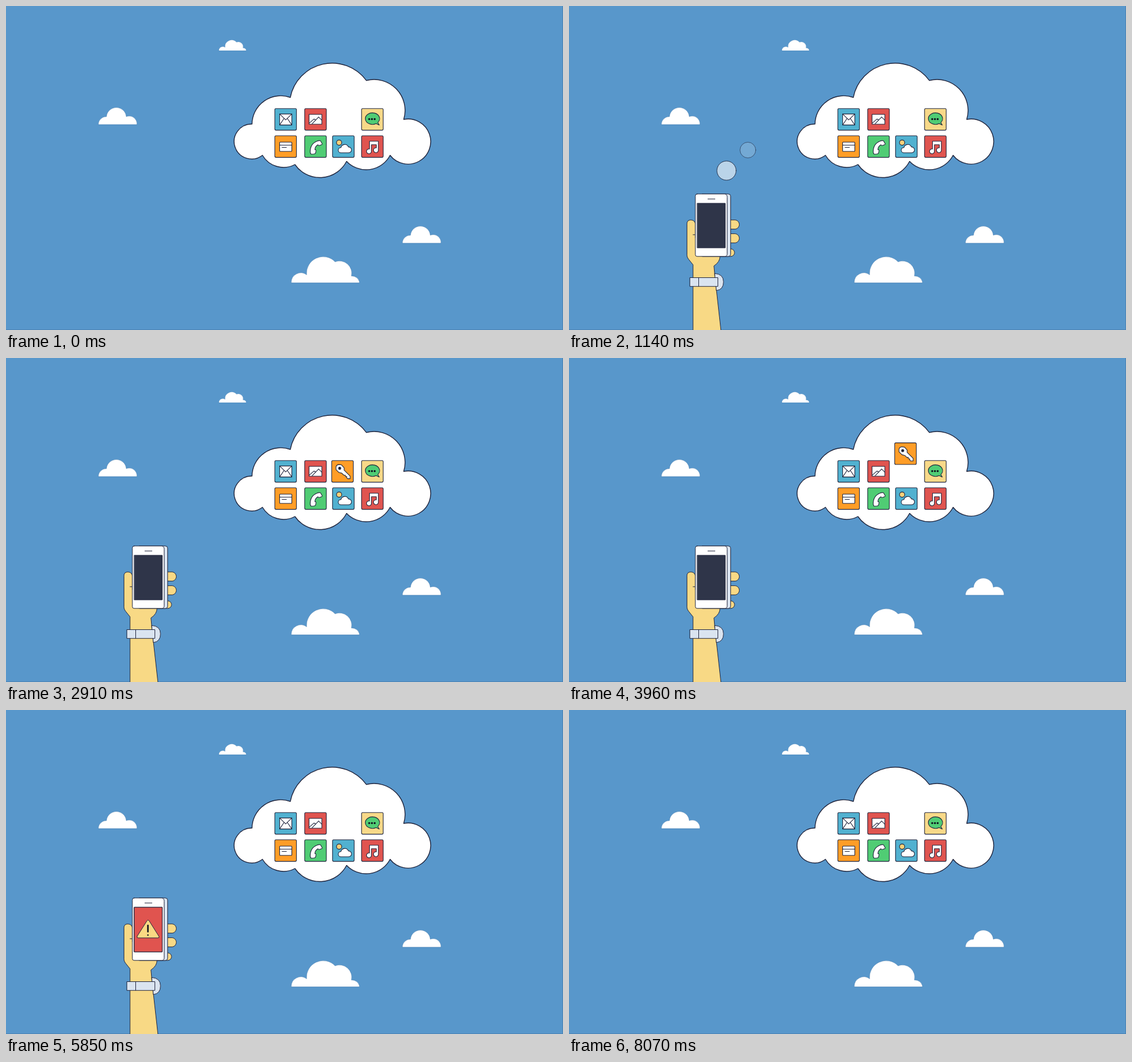
An HTML page for the animation above (8.1 s loop, 960 px wide and 560 px high).

```html
<!DOCTYPE html>
<html lang="en">
<head>
<meta charset="utf-8">
<title>Cloud key</title>
<style>
html, body { margin: 0; width: 100%; height: 100%; overflow: hidden; background: #5897cb; }
svg { display: block; width: 960px; height: 560px; }
</style>
</head>
<body>
<svg viewBox="0 0 960 560" fill="#fff" stroke="#20253d" stroke-width="1.1" stroke-linejoin="round" stroke-linecap="round">
  <defs>
    <filter id="blur" filterUnits="userSpaceOnUse" x="150" y="280" width="180" height="700">
      <feGaussianBlur id="smear" stdDeviation="0 0"/>
    </filter>
    <path id="puff" d="M159 204.5A13.5 13.5 0 0 1 173 191A17.05 17.05 0 0 1 207 191A13.5 13.5 0 0 1 225.5 204.5Z"/>
    <path id="drift" d="M0 45A16.5 16.5 0 0 1 26.5 31.5A28.5 28.5 0 0 1 75.5 9A21 21 0 0 1 103.5 33.5A13 13 0 0 1 117.5 45Z"/>
    <rect id="tile" width="37.3" height="37.3" rx="2"/>
  </defs>

  <rect width="960" height="560" fill="#5897cb" stroke="none"/>
  <path d="M959.5 0V559.5H0" fill="none" stroke="#4a82b4"/>

  <g stroke="#35699b" stroke-opacity=".5" stroke-width=".7">
    <use href="#puff" x=".2" y=".2"/>
    <use href="#puff" x="524.2" y="205.200"/>
    <use href="#drift" x="491.7" y="433.200"/>
    <use href="#drift" transform="translate(367 59) scale(.4)"/>
  </g>

  <path stroke-width="1.4" d="M424 204A30.2 30.2 0 1 0 442 258A42 42 0 0 0 498 274A52 52 0 0 0 587 268.500A46.500 46.500 0 0 0 662 258A39 39 0 1 0 685.500 196A53.500 53.500 0 0 0 621 128.700A73.300 73.300 0 0 0 490 158A49.500 49.500 0 0 0 424 204Z"/>

  <g transform="translate(463.3 177.3)">
    <use href="#tile" fill="#51b1d0"/>
    <rect x="8.300" y="9.300" width="21" height="19"/>
    <path fill="none" d="M8.300 9.300L18.800 19.500L29.300 9.300M8.300 28.300L16 17M29.300 28.300L21.500 17"/>
  </g>
  <g transform="translate(514.8 177.3)">
    <use href="#tile" fill="#e0544f"/>
    <rect x="7.500" y="10" width="22" height="17"/>
    <path fill="none" d="M8 25L16 18L19 20M13 26L24 14.500L29.500 20"/>
  </g>
  <g transform="translate(612.8 177.3)">
    <use href="#tile" fill="#f8d988"/>
    <path fill="#50cc74" d="M25 26L30.500 28.500L28 24A12.300 10 0 1 0 25 26Z"/>
    <path d="M13.200 18.200h.01M17.900 18.200h.01M22.600 18.200h.01" stroke-width="3.500" stroke="#101420"/>
  </g>
  <g transform="translate(463.3 224.3)">
    <use href="#tile" fill="#ff9d27"/>
    <rect x="8.300" y="11" width="21" height="16" rx="1"/>
    <path d="M8.300 16.200h21M12.500 20.200h7.500"/>
  </g>
  <g transform="translate(514.8 224.3)">
    <use href="#tile" fill="#50cc74"/>
    <path d="M21 9.500Q24 8 27 8.500L30 13.500Q30.500 15 29 15.500L25 17Q23.500 17 23 15.500Q18 18 17.500 24Q19 23.500 19.500 25L19 29Q18.500 31 16.500 31.500L11.500 32Q9.500 31 9.500 28Q9.500 14 21 9.500Z"/>
  </g>
  <g transform="translate(562.8 224.3)">
    <use href="#tile" fill="#51b1d0"/>
    <circle cx="11.300" cy="11.800" r="4.500" fill="#f8d27a"/>
    <path d="M14.500 29.500a4.600 4.600 0 0 1 0-9.200a6.700 6.700 0 0 1 12.800-1a5 5 0 0 1 .5 10.200z"/>
  </g>
  <g transform="translate(612.8 224.3)">
    <use href="#tile" fill="#e0544f"/>
    <path d="M13.700 9.500H29V25a4.200 4.200 0 1 1-3.500-4.200V15.500H17V27a4.200 4.200 0 1 1-3.300-4.200Z"/>
  </g>

  <g id="key">
    <use href="#tile" fill="#ff9d27"/>
    <path d="M7.500 10.500Q9 7 12.500 6.800L17 7.500L21.500 12.500V16.500L31.800 26.800V31.300H27.500L26 29.800V27.600H23.600V25.200H21L17.500 21.800L12.500 20.500L7.500 15.500Z"/>
    <circle cx="13.800" cy="13.300" r="2" fill="#101420"/>
  </g>

  <g id="dots" stroke="#26344f" stroke-width="1"></g>

  <g id="hand" stroke-width="1">
    <g fill="#f8d985">
      <path d="M270 369.500h16.500a8 8 0 0 1 0 15.800H270zM270 393.300h16.500a8 8 0 0 1 0 15.800H270zM260 419.500h18.500a6.500 6.500 0 0 1 0 13H260z"/>
      <path d="M213.500 600V447L205.500 437Q203 434 203 430V376Q203 369.500 210 369.500Q217 370 217.500 377V400H260V432Q260 442 249.500 449L251.500 470L266 600Z"/>
    </g>
    <path d="M213.500 395h4"/>
    <g fill="#dae4f0">
      <path d="M251 462Q266 463 266 476.500Q266 490 254 491.500Z"/>
      <path d="M208.300 469.200h48v15.200h-48zM223.200 469.200v15.200"/>
      <rect x="226" y="324.600" width="52.300" height="108" rx="4"/>
    </g>
    <path d="M220.500 324.600H268Q272.300 325 272.300 330V428Q272.300 432.500 268 432.500H220.500Q217.500 432.500 217.500 429.500V328Q217.500 324.600 220.500 324.600ZM239 333.300h12.300"/>
    <rect x="221" y="340.700" width="48" height="77" fill="#2f3549"/>
    <g id="alert">
      <rect x="221" y="340.700" width="48" height="77" fill="#e0544f"/>
      <path id="sign" d="M242.800 363.800Q244.500 361.300 246.200 363.800L263.300 391Q264.300 393.600 261.500 393.600H227.500Q224.700 393.600 225.700 391Z"/>
      <path d="M244.300 372v11M244.300 388.700v.01" stroke="#101420" stroke-width="2.600"/>
    </g>
  </g>
</svg>
<script>
const LOOP = 8100, DROP = 240;
const $ = id => document.getElementById(id);
const ramp = (t, a, b) => Math.min(1, Math.max(0, (t - a) / (b - a)));

const dots = [[271.500, 284.500], [308.300, 249], [348, 224]].map(([cx, cy]) => {
  const dot = document.createElementNS('http://www.w3.org/2000/svg', 'circle');
  dot.setAttribute('cx', cx);
  dot.setAttribute('cy', cy);
  return $('dots').appendChild(dot);
});

// vertical offset of the hand: eases up into place, later drops away
const handY = t => DROP * ((1 - ramp(t, 30, 400)) ** 3 + ramp(t, 6060, 6420) ** 3);

function drawHand(t) {
  const y = handY(t), speed = Math.abs(handY(t + 15) - handY(t - 15));
  const hand = $('hand');
  hand.setAttribute('transform', `translate(.3 ${y + .3})`);
  hand.style.display = y >= DROP ? 'none' : '';
  if (speed > .2) {
    hand.setAttribute('filter', 'url(#blur)');
    $('smear').setAttribute('stdDeviation', `0 ${Math.min(10, speed * .7)}`);
  } else hand.removeAttribute('filter');
}

function drawDots(t) {
  const fade = 1 - ramp(t, 1620, 1860);
  dots.forEach((dot, i) => {
    const grow = ramp(t, 1000 + i * 100, 1240 + i * 100);
    dot.setAttribute('r', 11 + 6 * (1 - (1 - grow) ** 3));
    dot.setAttribute('fill-opacity', grow * fade);
    dot.setAttribute('stroke-opacity', Math.min(1, grow * 4) * fade);
  });
}

function drawKey(t) {
  const size = 1 - (1 - ramp(t, 1710, 1980)) ** 3;
  const rise = 230 * ramp(t, 3720, 4380) ** 2;
  const key = $('key');
  key.style.display = size > 0 && rise < 230 ? '' : 'none';
  key.setAttribute('transform', `translate(580 ${196 - rise}) scale(${size}) translate(-18.700 -18.700)`);
}

function drawAlert(t) {
  $('alert').style.opacity = ramp(t, 4380, 4530);
  const dim = .08 + .08 * Math.cos((t - 4620) / 820 * 2 * Math.PI);
  const shade = [250, 217, 131].map(c => Math.round(c * (1 - dim)));
  $('sign').setAttribute('fill', `rgb(${shade})`);
}

const start = performance.now();
function frame() {
  const t = (performance.now() - start) % LOOP;
  drawHand(t);
  drawDots(t);
  drawKey(t);
  drawAlert(t);
  requestAnimationFrame(frame);
}
frame();
</script>
</body>
</html>
```
